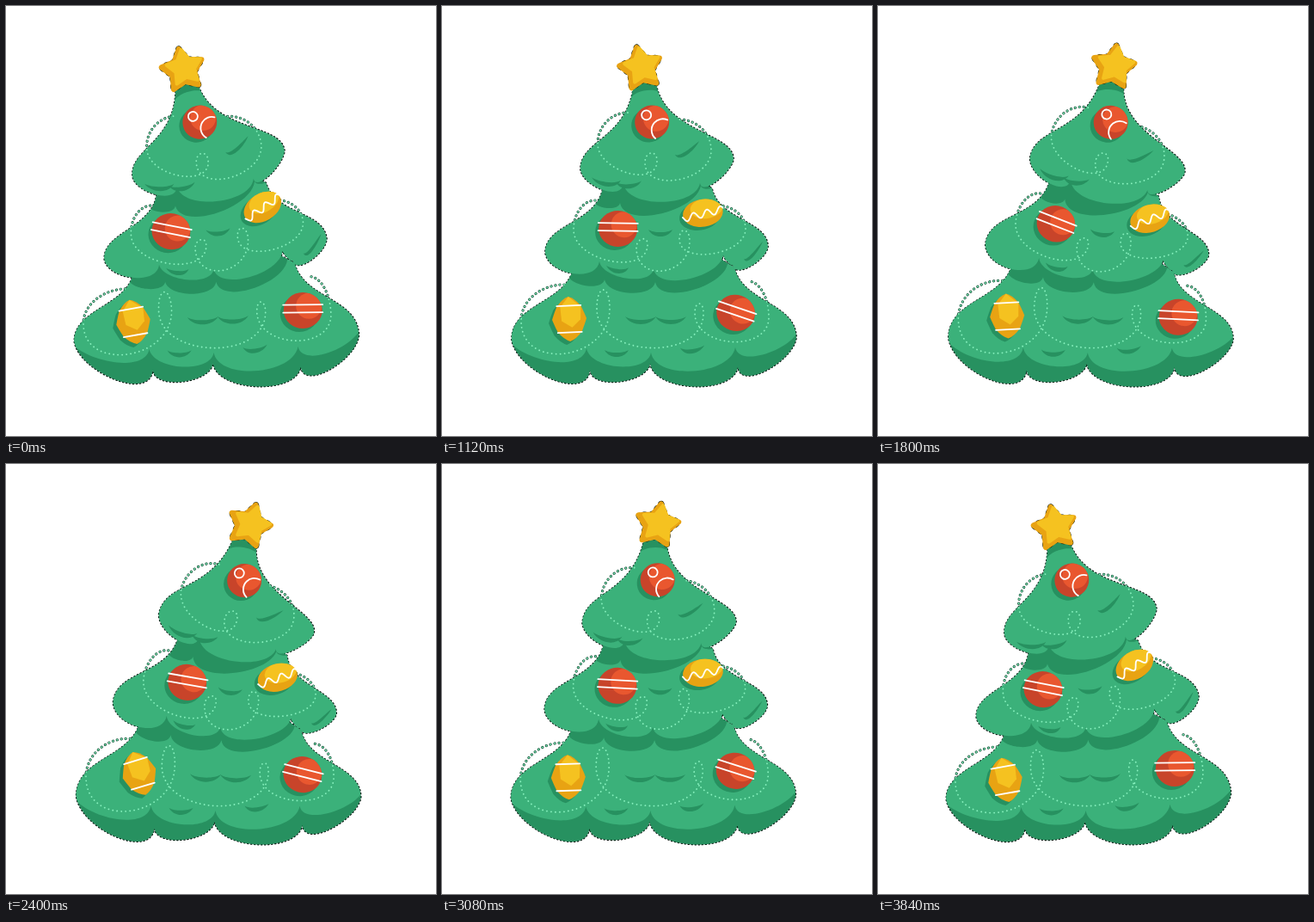
Animation of 500x500 px, one loop 3880 ms. Source, as an HTML page with a canvas:

```html
<!DOCTYPE html>
<html>
<head>
<meta charset="utf-8">
<style>
html, body { margin: 0; overflow: hidden; background: #fff; }
canvas { display: block; }
</style>
</head>
<body>
<canvas id="stage" width="500" height="500"></canvas>
<script>
const ctx = document.getElementById('stage').getContext('2d');
const LOOP = 3880, STEP = 40, REST = 1120, W = 2 * Math.PI / 3840, RAD = Math.PI / 180;
const GREEN = '#3bb17a', SHADE = '#279160', MINT = '#86f0bd', EDGE = '#06160f';
const RED = '#e9572f', DARK_RED = '#c8442a', GOLD = '#f5c220', DARK_GOLD = '#e8a313';

// Upright pose. A hem runs from the left lobe over the notches to the right lobe;
// layers are scalloped areas painted inside the tier.
const tiers = [
  { top: [153, 340, 304], pinch: 0.5, fill: SHADE,
    hem: [[81, 388], [172, 424], [242, 416], [344, 420], [412, 386]],
    layers: [
      { color: GREEN, puff: 0.25, hem: [[72, 378], [168, 398], [243, 403], [341, 397], [416, 373]] },
      { color: SHADE, puff: 0.24, hem: [[146, 312], [189, 318], [248, 321], [332, 300]] }] },
  { top: [187, 314, 212], pinch: 0.55, fill: GREEN,
    hem: [[120, 287], [183, 297], [246, 306], [327, 290], [338, 301], [379, 280]],
    layers: [{ color: SHADE, puff: 0.24, hem: [[176, 226], [207, 229], [301, 209], [320, 207]] }] },
  { top: [223, 249, 91], pinch: 0.65, fill: GREEN,
    hem: [[161, 190], [211, 207], [300, 206], [339, 178]],
    layers: [{ color: SHADE, puff: -0.24, hem: [[219, 109], [257, 105]] }] }
];

// Swags and loops alternate: each node is x, y and the sag to the next one.
const garlands = [
  { start: [35, 36], end: [37, 36],
    nodes: [[181, 160, 24], [250, 180, -10], [236, 182, 27], [313, 168]] },
  { start: [25, 34], end: [33, 27],
    nodes: [[153, 260, 28], [239, 277, -8], [226, 281, 31], [288, 273, -11], [276, 271, 23], [353, 259]] },
  { start: [50, 42], end: [24, 42],
    nodes: [[92, 366, 45], [195, 352, -22], [180, 352, 43], [304, 357, -11], [294, 357, 31], [380, 362]] }
];

// x, y, half width, slope
const creases = [
  [191, 201, 17, 0.1], [217, 204, 15, -0.05], [285, 165, 14, -0.55], [254, 260, 14, 0], [362, 284, 11, -0.9],
  [204, 303, 13, 0.1], [231, 361, 18, 0], [266, 361, 18, 0], [203, 400, 14, 0], [291, 396, 14, -0.1]
];

// Each bauble hangs at (x, y) and swings twice per loop.
const baubles = [
  { x: 243, y: 115, drop: 20, mean: -7, swing: 7, peak: 1430, draw: ringBall },
  { x: 205, y: 239, drop: 20, mean: 7, swing: 9, peak: -100, draw: stripedBall },
  { x: 301, y: 226, drop: 15, mean: -18, swing: -9, peak: 150, draw: oval },
  { x: 348, y: 338, drop: 20, mean: 11, swing: -10, peak: -50, draw: stripedBall },
  { x: 147, y: 342, drop: 22, mean: -8, swing: 10, peak: 1430, draw: gem }
];

let time, cosPart, sinPart;

const height = y => Math.max(0, 430 - y);

// Slope of the bent trunk, and the bend itself: the tip sways widest and latest.
function tilt(y) {
  const h = height(y);
  return -(cosPart * 1.115e-4 * h ** 1.3 + sinPart * 1.26e-6 * h * h);
}

function bend(x, y) {
  const h = height(y);
  const dx = -(cosPart * (1 + 4.85e-5 * h ** 2.3) + sinPart * 4.2e-7 * h ** 3);
  return [x + dx, y + (x - 245) * tilt(y) + dx * dx / 1000];
}

function curve(path, ...points) {
  path.bezierCurveTo(...points.flatMap(p => bend(...p)));
}

function arch(path, [x1, y1], [x2, y2], sag, inset = 0) {
  const k = sag * 4 / 3, dx = (x2 - x1) * inset;
  curve(path, [x1 + dx, y1 + k], [x2 - dx, y2 + k], [x2, y2]);
}

function scallop(path, hem, puff, lobe = puff) {
  const last = hem.length - 2;
  for (let i = 0; i <= last; i++) {
    const width = hem[i + 1][0] - hem[i][0];
    arch(path, hem[i], hem[i + 1], width * (i % last ? puff : lobe), 0.06);
  }
}

function tierPath({ top: [left, right, y], pinch, hem }) {
  const path = new Path2D(), [lx, ly] = hem[0], [rx, ry] = hem[hem.length - 1];
  const mid = (end, start = y) => start + (end - start) * pinch;
  path.moveTo(...bend((left + right) / 2, y - (right - left) * 0.3));
  path.lineTo(...bend(left, y));
  curve(path, [left + (lx - left) * 0.12, mid(ly)], [lx, mid(ly)], [lx, ly]);
  scallop(path, hem, 0.24, 0.3);
  curve(path, [rx, mid(ry)], [right + (rx - right) * 0.12, mid(ry)], [right, y]);
  path.closePath();
  return path;
}

function layerPath({ hem, puff }) {
  const path = new Path2D(), [x1, y1] = hem[0], [x2, y2] = hem[hem.length - 1];
  path.moveTo(...bend(x1, y1));
  scallop(path, hem, puff);
  path.lineTo(...bend(x2, y2 - 140));
  path.lineTo(...bend(x1, y1 - 140));
  return path;
}

function garlandPath({ start: [sw, sh], end: [ew, eh], nodes }) {
  const path = new Path2D(), [x, y] = nodes[0], [ex, ey] = nodes[nodes.length - 1];
  path.moveTo(...bend(x + sw, y - sh));
  curve(path, [x + sw * 0.45, y - sh], [x, y - sh * 0.55], [x, y]);
  for (let i = 1; i < nodes.length; i++) arch(path, nodes[i - 1], nodes[i], nodes[i - 1][2]);
  curve(path, [ex, ey - eh * 0.55], [ex - ew * 0.45, ey - eh], [ex - ew, ey - eh]);
  return path;
}

function fill(path, color) {
  ctx.fillStyle = color;
  ctx.fill(path);
}

function stroke(path, color, width, dash = []) {
  ctx.strokeStyle = color;
  ctx.lineWidth = width;
  ctx.setLineDash(dash);
  ctx.stroke(path);
}

function within(path, draw) {
  ctx.save();
  ctx.clip(path);
  draw();
  ctx.restore();
}

function ellipse(x, y, rx, ry = rx) {
  const path = new Path2D();
  path.ellipse(x, y, rx, ry, 0, 0, 7);
  return path;
}

function crease(x, y, half, slope) {
  const rise = half * slope, a = [x - half, y - rise], b = [x + half, y + rise];
  const path = new Path2D();
  path.moveTo(...bend(...a));
  arch(path, a, b, half * 0.22 + 5, 0.2);
  arch(path, b, a, half * 0.22, 0.2);
  fill(path, SHADE);
}

// Bauble body with its shadow on the tree and a lit patch.
function body(shape, angle, dark, light, patch) {
  ctx.save();
  ctx.rotate(-angle);
  ctx.translate(-4, 4);
  ctx.rotate(angle);
  fill(shape, SHADE);
  ctx.restore();
  fill(shape, dark);
  within(shape, () => fill(patch, light));
}

function lines(half, ...rows) {
  for (const y of rows) stroke(new Path2D(`M${-half} ${y}H${half}`), '#fff', 1.8);
}

function ringBall(angle) {
  const arc = new Path2D();
  body(ellipse(0, 0, 20, 19.5), angle, DARK_RED, RED, ellipse(5, -4, 15));
  arc.arc(12, 10, 13, 2.35, 5.2);
  stroke(arc, '#fff', 1.8);
  stroke(ellipse(-6, -8.5, 5.5), '#fff', 1.8);
}

function stripedBall(angle) {
  body(ellipse(0, 0, 22.5, 21), angle, DARK_RED, RED, ellipse(7, -5, 15));
  lines(23, -6.5, 2.5);
}

function oval(angle) {
  const wave = new Path2D();
  for (let x = -24; x <= 24; x++) wave.lineTo(x, 1 - x * 0.08 + 4 * Math.cos(0.393 * (x + 19)));
  body(ellipse(0, 0, 23.5, 16), angle, DARK_GOLD, GOLD, ellipse(5, -5, 19, 12));
  stroke(wave, '#fff', 1.8);
}

function gem(angle) {
  const shape = new Path2D('M0-26Q7-24 14-15Q18-6 20 0Q18 6 14 15Q7 24 0 26Q-7 24-14 15Q-18 6-20 0Q-18-6-14-15Q-7-24 0-26');
  body(shape, angle, DARK_GOLD, GOLD, new Path2D('M0-26L14-14L13 1L3 10L-9 2L-10-14Z'));
  lines(14, -15.5, 15.5);
}

function starPath(x, y, size) {
  const path = new Path2D();
  for (let i = 0; i < 10; i++) {
    const r = i % 2 ? size * 0.55 : size, a = i * Math.PI / 5;
    path.lineTo(x + r * Math.sin(a), y - r * Math.cos(a));
  }
  path.closePath();
  return path;
}

function star() {
  const back = starPath(-1, 1, 25), front = starPath(1.5, -1.5, 21);
  ctx.save();
  ctx.translate(...bend(236, 93));
  ctx.rotate(-18 * RAD * Math.cos(W * (time - 560)));
  ctx.translate(0, -22);
  stroke(back, EDGE, 7, [1, 8]);
  stroke(back, DARK_GOLD, 6);
  fill(back, DARK_GOLD);
  stroke(front, GOLD, 4);
  fill(front, GOLD);
  ctx.restore();
}

function bauble({ x, y, drop, mean, swing, peak, draw }) {
  const angle = tilt(y + drop) + RAD * (mean + swing * Math.cos(2 * W * (time - peak)));
  ctx.save();
  ctx.translate(...bend(x, y));
  ctx.rotate(angle);
  ctx.translate(0, drop);
  draw(angle);
  ctx.restore();
}

function render() {
  time = Math.floor(performance.now() % LOOP / STEP) * STEP;
  cosPart = Math.cos(W * time) - Math.cos(W * REST);
  sinPart = Math.sin(W * time) - Math.sin(W * REST);
  ctx.clearRect(0, 0, 500, 500);
  ctx.lineJoin = ctx.lineCap = 'round';

  const strings = garlands.map(garlandPath);
  const outlines = tiers.map(tierPath);
  outlines.forEach(path => stroke(path, EDGE, 1.8, [1, 3]));
  strings.forEach(path => stroke(path, '#0b4a30', 3.2, [0.1, 4.9]));
  tiers.forEach(({ fill: color, layers }, i) => {
    fill(outlines[i], color);
    within(outlines[i], () => layers.forEach(layer => fill(layerPath(layer), layer.color)));
  });
  creases.forEach(c => crease(...c));
  strings.forEach(path => stroke(path, MINT, 1.8, [0.1, 4.9]));
  baubles.forEach(bauble);
  star();
  requestAnimationFrame(render);
}
render();
</script>
</body>
</html>
```
